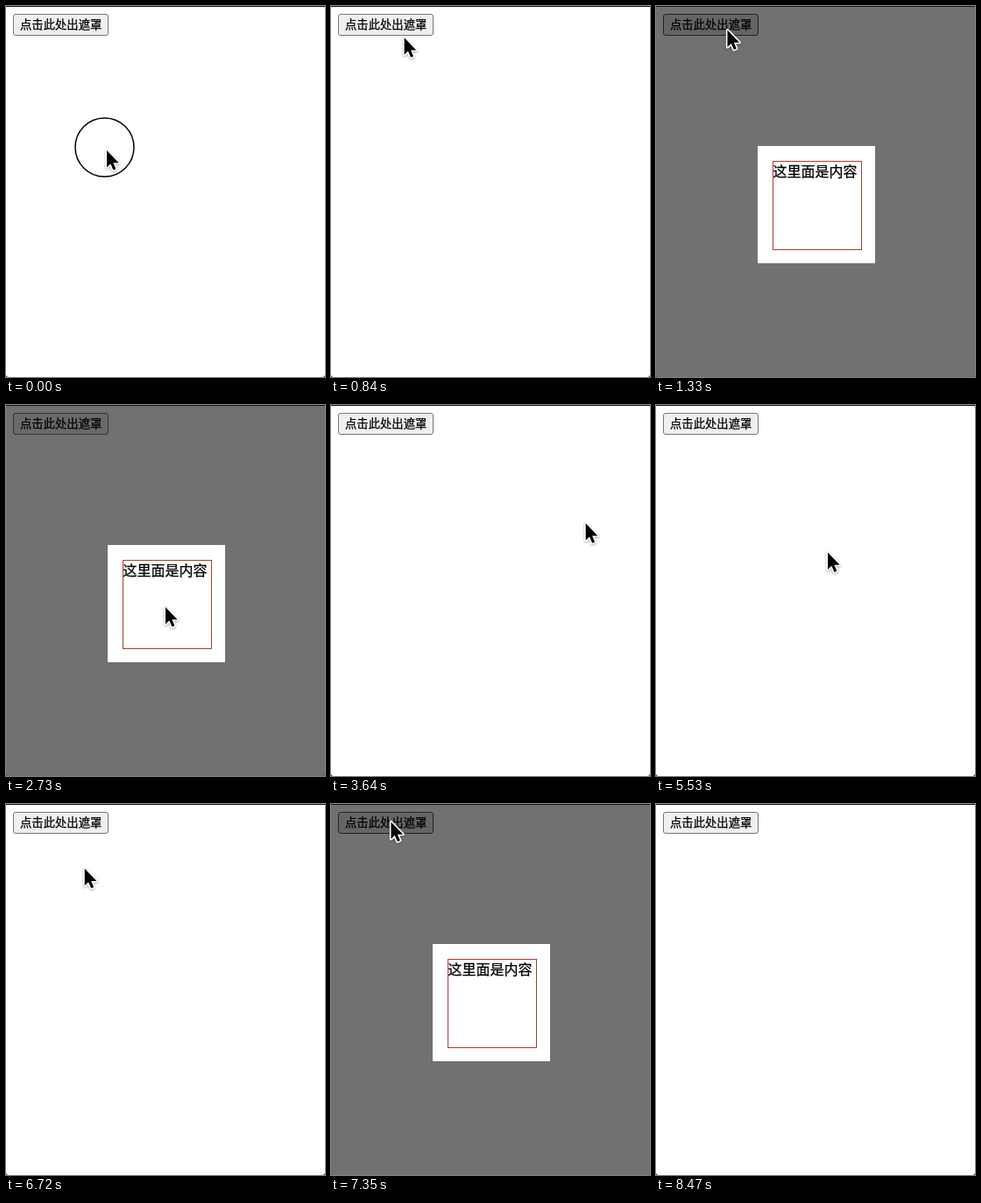
Animation, 364 px wide and 424 px high, one loop 8750 ms. Source, as an HTML page:

```html
<!DOCTYPE html>
<html lang="zh">
<head>
<meta charset="utf-8">
<style>
html, body { margin: 0; width: 100%; height: 100%; overflow: hidden; background: #fff; }
svg { display: block; width: 364px; height: 424px; }
text { font-family: "Noto Sans CJK SC", "Noto Sans CJK", sans-serif; fill: #000; stroke: #000; stroke-width: .25; }
</style>
</head>
<body>
<svg viewBox="0 0 364 424">
  <rect width="364" height="424" fill="#fff"/>
  <rect id="button" x="8.5" y="9.5" width="108" height="24" rx="2.5"/>
  <text x="16" y="26" font-size="13.333">点击此处出遮罩</text>
  <g id="mask">
    <rect width="364" height="424" fill="#000" fill-opacity=".555"/>
    <rect x="116" y="160" width="134" height="134" fill="#fff"/>
    <rect x="133.5" y="177.5" width="101" height="101" fill="none" stroke="#b03a34"/>
    <text x="133.5" y="195" font-size="16">这里面是内容</text>
  </g>
  <rect width="364" height="1" fill="#111"/>
  <path d="M0 422V424H2ZM364 422V424H362Z" fill="#555"/>
  <circle id="ring" r="33.5" fill="none" stroke="#000" stroke-width="1.5"/>
  <path id="cursor" d="M0 0V19.500L4.300 15.300L7.400 22.500L10.400 21.200L7.400 14.200H13.700Z"
    stroke="#fff" stroke-width="3.2" stroke-linejoin="round" paint-order="stroke"
    style="filter:drop-shadow(0 1px 1px rgba(0,0,0,.35))"/>
</svg>
<script>
const LOOP = 8750, TICK = 70, HOVER_LAG = 210;
const [button, mask, ring, cursor] = ['button', 'mask', 'ring', 'cursor'].map(id => document.getElementById(id));

// pointer stops: arrive, leave, x, y, how long a click is held before leaving
const stops = [
  [0, 70, 115, 165, 70],
  [980, 1330, 81.5, 27.5, 140],
  [2170, 2240, 197, 267, 0],
  [2520, 2730, 182, 231, 70],
  [3430, 3570, 298, 139, 140],
  [4200, 4340, 84, 30, 140],
  [5250, 5530, 196, 168.5, 140],
  [6580, 6650, 91, 77, 0],
  [7140, 7350, 68.5, 20.5, 140],
  [7980, 8190, 56, 184, 70],
  [8470, LOOP, -30, 190, 0]
];
const inside = (x, y, l, t, r, b) => x > l && x < r && y > t && y < b;
const onButton = (x, y) => inside(x, y, 8, 9, 117, 34);
const onContent = (x, y) => inside(x, y, 133, 177, 235, 279);
const smooth = k => k * k * (3 - 2 * k);
const show = (node, on) => node.setAttribute('visibility', on ? 'visible' : 'hidden');

function tipAt(t) {
  const i = stops.findLastIndex(s => s[0] <= t);
  const [, leave, x, y] = stops[i];
  if (t <= leave) return [x, y];
  const [arrive, , nx, ny] = stops[i + 1];
  const k = smooth((t - leave) / (arrive - leave));
  return [x + (nx - x) * k, y + (ny - y) * k];
}

// a click on the button opens the mask, one outside the content closes it
function openedAt(t) {
  let opened = null;
  for (const [, leave, x, y, hold] of stops) {
    if (!hold || leave > t || onContent(x, y)) continue;
    opened = onButton(x, y) ? leave : null;
  }
  return opened;
}

function draw(time) {
  const t = Math.floor(time % LOOP / TICK) * TICK;
  const [x, y] = tipAt(t), opened = openedAt(t), open = opened !== null;
  const down = stops.some(([, leave, , , hold]) => t >= leave - hold && t < leave);
  const hover = open ? t < opened + HOVER_LAG : onButton(x, y);
  const [fill, stroke] = hover && down ? ['#f5f5f5', '#8d8d8d']
    : hover ? ['#e5e5e5', '#4f4f4f'] : ['#efefef', '#767676'];
  button.setAttribute('fill', fill);
  button.setAttribute('stroke', stroke);
  show(mask, open);
  show(ring, down);
  ring.setAttribute('cx', x - 2.5);
  ring.setAttribute('cy', y - 3.5);
  cursor.setAttribute('transform', `translate(${x} ${y})`);
}

const start = performance.now();
function frame(now) {
  draw(Math.max(0, now - start));
  requestAnimationFrame(frame);
}
draw(0);
requestAnimationFrame(frame);
</script>
</body>
</html>
```
